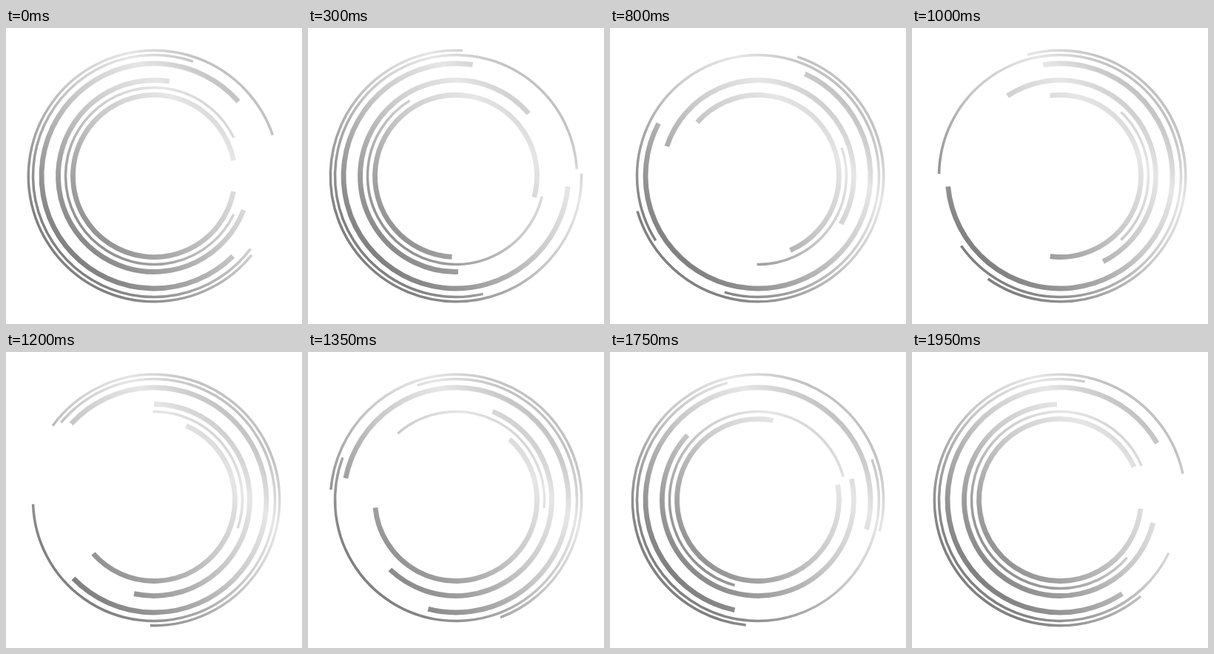
An HTML page that plays this animation: 400 px wide and 400 px high, repeating every 2 s.

```html
<!DOCTYPE html>
<html lang="en">
<head>
<meta charset="utf-8">
<title>Rotating rings</title>
<style>
  html, body { margin: 0; width: 100%; height: 100%; overflow: hidden; background: #fff; }
  svg { display: block; width: 100%; height: 100%; }
</style>
</head>
<body>
<svg viewBox="0 0 400 400">
  <defs>
    <linearGradient id="steel" gradientUnits="userSpaceOnUse" x1="92" y1="308" x2="310" y2="90">
      <stop offset="0" stop-color="#808080"/>
      <stop offset="0.5" stop-color="#c8c8c8"/>
      <stop offset="0.8" stop-color="#e6e6e6"/>
      <stop offset="1" stop-color="#c2c2c2"/>
    </linearGradient>
  </defs>
  <g id="rings" fill="none" stroke="url(#steel)"></g>
</svg>
<script>
const LOOP = 2000;
const STEP = 50;
const CENTER = 200;
const THIN = 3.5;
const THICK = 6.8;

// Angles in degrees, clockwise from east; grow and sway follow the eased pulse.
const rings = [
  { radius: 169.7, width: THIN,  turn: -1, middle: 190,   length: 302,   grow: -72,  sway: 0 },
  { radius: 163.5, width: THIN,  turn: 1,  middle: 162.9, length: 251.8, grow: 72,   sway: 0 },
  { radius: 152,   width: THICK, turn: -1, middle: 182,   length: 273.2, grow: 0,    sway: 36 },
  { radius: 129.5, width: THICK, turn: 1,  middle: 150,   length: 258.5, grow: -72,  sway: 0 },
  { radius: 119.5, width: THIN,  turn: -1, middle: 180,   length: 308.8, grow: -216, sway: 0 },
  { radius: 109.5, width: THICK, turn: 1,  middle: 180,   length: 338,   grow: -144, sway: 0 },
];

const group = document.getElementById("rings");
for (const ring of rings) {
  ring.path = document.createElementNS("http://www.w3.org/2000/svg", "path");
  ring.path.setAttribute("stroke-width", ring.width);
  group.append(ring.path);
}

const bezier = (a, b, u) =>
  3 * a * u * (1 - u) ** 2 + 3 * b * u * u * (1 - u) + u ** 3;

// Linear departure, soft arrival.
function ease(x) {
  let low = 0, high = 1;
  for (let i = 0; i < 24; i++) {
    const mid = (low + high) / 2;
    if (bezier(1 / 6, 2 / 3, mid) < x) low = mid;
    else high = mid;
  }
  return bezier(1 / 6, 1, low);
}

function point(radius, degrees) {
  const angle = degrees * Math.PI / 180;
  const x = CENTER + radius * Math.cos(angle);
  const y = CENTER + radius * Math.sin(angle);
  return `${x.toFixed(3)} ${y.toFixed(3)}`;
}

function arc(radius, middle, length) {
  const from = point(radius, middle - length / 2);
  const to = point(radius, middle + length / 2);
  return `M${from}A${radius} ${radius} 0 ${length > 180 ? 1 : 0} 1 ${to}`;
}

function draw(time) {
  const phase = Math.floor(time % LOOP / STEP) * STEP / LOOP;
  const pulse = ease(1 - Math.abs(1 - 2 * phase));
  for (const { path, radius, turn, middle, length, grow, sway } of rings) {
    const heading = middle + turn * 360 * phase + sway * pulse;
    path.setAttribute("d", arc(radius, heading, length + grow * pulse));
  }
}

const start = performance.now();
function tick() {
  draw(performance.now() - start);
  requestAnimationFrame(tick);
}
tick();
</script>
</body>
</html>
```
